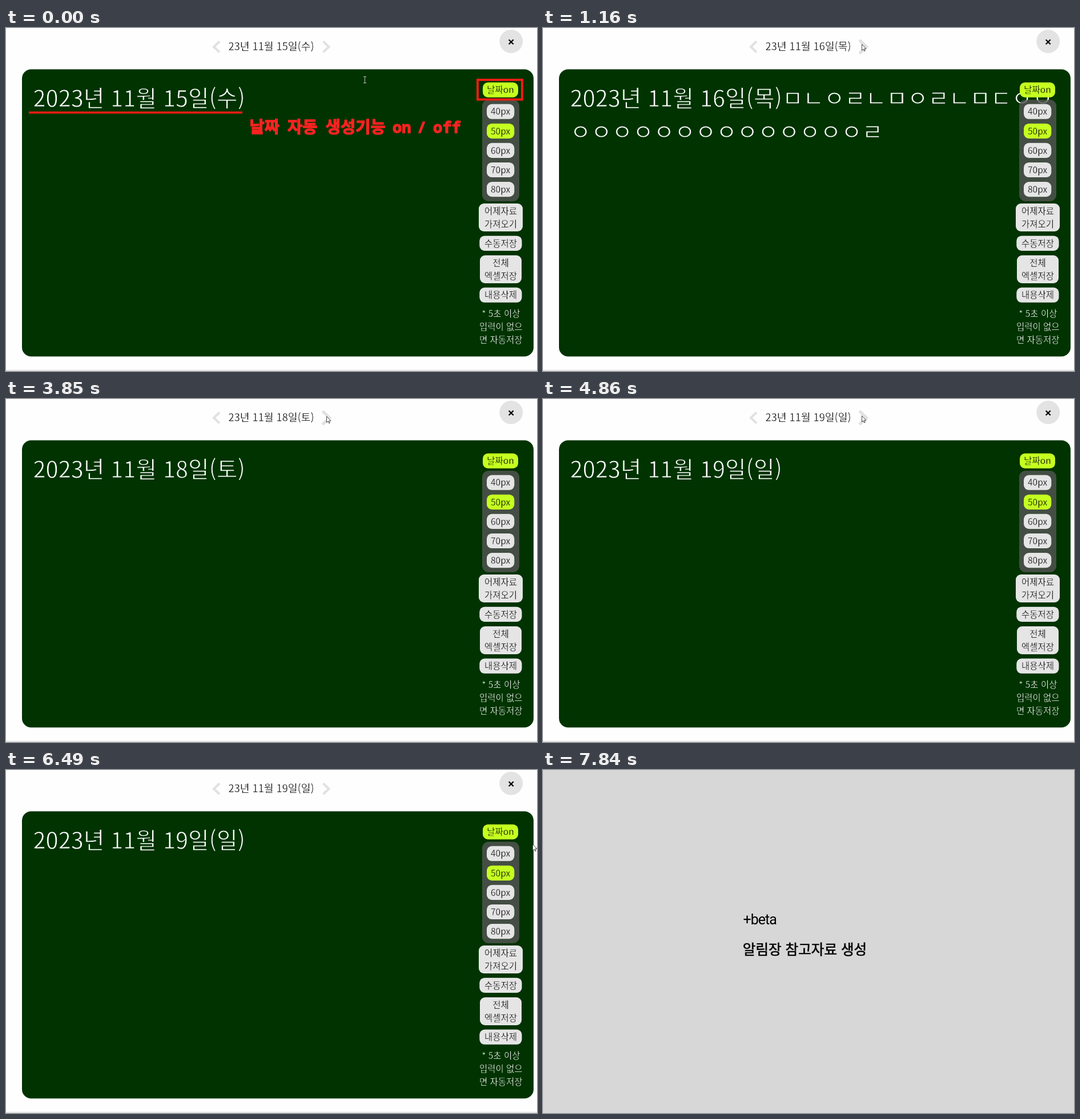
An HTML page for the animation above (8 s loop, 930 by 602 pixels).

```html
<!DOCTYPE html>
<html lang="ko">
<head>
<meta charset="utf-8">
<title>알림장</title>
<style>
  html, body { margin: 0; width: 100%; height: 100%; overflow: hidden; background: #fefefe; }
  svg { display: block; width: 100%; height: 100%; }
  text { font-family: "Noto Sans CJK KR", "Noto Sans CJK", sans-serif; font-weight: 350; }
  /* a stroke in the background colour thins the regular weight */
  .board { font-size: 39.7px; font-weight: 300; fill: #fff; stroke: #003300; stroke-width: .9; }
  .header { font-size: 18.2px; text-anchor: middle; stroke: #fefefe; stroke-width: .35; }
  .label { font-size: 15.5px; text-anchor: middle; stroke-width: .35; }
  .chevron { fill: none; stroke: #e1e1e1; stroke-width: 4; }
  .callout { font-size: 28.5px; font-weight: 900; word-spacing: 6.2px;
             fill: #ff2222; stroke: #ff2222; stroke-width: 1.3; stroke-linejoin: round; }
  .mono { font-family: "Noto Sans Mono", "DejaVu Sans Mono", monospace; font-size: 27px; }
  .title { font-size: 24.6px; font-weight: 400; stroke: #000; stroke-width: .6; }
  .beta { font-family: Roboto, sans-serif; font-size: 25px; font-weight: 400; letter-spacing: -1px; }
</style>
</head>
<body>
<svg viewBox="0 0 930 602" preserveAspectRatio="none">
  <g id="app">
    <rect width="930" height="602" fill="#fefefe"/>
    <rect y="600" width="930" height="1.5" fill="#dcdcdc"/>
    <path id="prev" class="chevron" d="M5 -9.5L-5 0L5 9.5"/>
    <path id="next" class="chevron" d="M-5 -9.5L5 0L-5 9.5"/>
    <text id="header" class="header" x="464.6" y="39.3"/>
    <circle cx="884.7" cy="23.5" r="20.5" fill="#e3e3e3"/>
    <path d="M880.7 20.5l8 8m0-8l-8 8" stroke="#000" stroke-width="2.3"/>
    <rect x="28" y="72.5" width="896" height="504" rx="16" fill="#003300"/>
    <text id="line1" class="board" x="47.6" y="138.4"/>
    <text id="line2" class="board" x="47.6" y="197"/>
    <rect x="834" y="126" width="65" height="178" rx="11" fill="#555" fill-opacity=".8"/>
    <g id="controls"></g>
    <g id="callout">
      <rect x="40" y="146.5" width="374" height="3.7" fill="#ee1c14"/>
      <rect x="826" y="91" width="78" height="34.5" fill="none" stroke="#ee1c14" stroke-width="4"/>
      <text class="callout" x="426.5" y="183.5">날짜 자동 생성기능<tspan class="mono" x="677">on</tspan><tspan class="mono" x="720">/</tspan><tspan class="mono" x="748">off</tspan></text>
    </g>
    <g id="cursor">
      <path id="beam" d="M-2.5 -5.5H2.5M0 -5.5V5.5M-2.5 5.5H2.5" stroke="#b4c4b4" fill="none"/>
      <path id="arrow" d="M.5 .5V11.3L3 9L4.8 12.7L6.3 12L4.6 8.4H8Z" fill="#fff" stroke="#333" stroke-width=".9"/>
      <path id="hand" d="M2.8 9V1.7Q3.8 -.2 5 1.7V5.5L9.3 6.8Q10.6 7.4 10.4 9L9.2 13V15.8H4V13.6L.8 9.6Q.4 7.6 2.8 9Z" fill="#fff" stroke="#111" stroke-width=".9"/>
    </g>
  </g>
  <g id="card">
    <rect width="930" height="602" fill="#d7d7d7"/>
    <text class="beta" x="350.5" y="271">+beta</text>
    <text class="title" x="349.8" y="323.8">알림장 참고자료 생성</text>
  </g>
</svg>
<script>
const LOOP = 8000, CARD_AT = 7840;
const GREY = '#e5e5e5', LIME = '#c5ff20', BOARD = '#003300';
const $ = id => document.getElementById(id);
const show = (id, on) => $(id).style.display = on ? '' : 'none';

function add(tag, attrs, text = '') {
  const el = document.createElementNS('http://www.w3.org/2000/svg', tag);
  for (const key in attrs) el.setAttribute(key, attrs[key]);
  el.textContent = text;
  $('controls').append(el);
}

function label(text, x, y, fill, background) {
  add('text', { class: 'label', x, y: y + 5.7, fill, stroke: background }, text);
}

function button(x, y, width, height, fill, ...lines) {
  add('rect', { x, y, width, height, rx: 9, fill });
  lines.forEach((line, i) => label(line, x + width / 2,
    y + height / 2 + (i - (lines.length - 1) / 2) * 22.7, '#000', fill));
}

button(835, 95.5, 62, 26.2, LIME, '날짜on');
for (let i = 0; i < 5; i++)
  button(842, 133.6 + i * 34.1, 48.3, 26.2, i === 1 ? LIME : GREY, `${40 + i * 10}px`);
button(828, 308, 77, 49, GREY, '어제자료', '가져오기');
button(829.3, 364.7, 74.2, 26.2, GREY, '수동저장');
button(830, 399, 73, 49, GREY, '전체', '엑셀저장');
button(829.3, 455.6, 74.2, 26.2, GREY, '내용삭제');
['* 5초 이상', '입력이 없으', '면 자동저장'].forEach((line, i) =>
  label(line, 866.8, 501.3 + i * 23, '#fff', BOARD));

// start time, pointer shape, pointer x, pointer y, day, hovered chevron
const steps = [
  [0, 'beam', 628.5, 91, 15],
  [500, 'arrow', 554, 24, 15, 'next'],
  [830, 'arrow', 558, 28, 15, 'next'],
  [1160, 'arrow', 558, 28, 16, 'next'],
  [1510, 'arrow', 566, 29, 16, 'next'],
  [1830, 'arrow', 561, 30, 16, 'next'],
  [2160, 'arrow', 561, 30, 17, 'next'],
  [3850, 'arrow', 561, 30, 18, 'next'],
  [4860, 'arrow', 558, 29, 19, 'next'],
  [5510, 'hand', 872, 114.5, 19],
  [5840, 'hand', 862, 95.5, 19],
  [6160, 'hand', 840, 109.5, 19],
  [6490, 'arrow', 922, 130, 19],
  [6850, 'arrow', 425, 52, 19],
  [7160, 'arrow', 369, 31, 19, 'prev'],
];

const notes = { 16: ['ㅁㄴㅇㄹㄴㅁㅇㄹㄴㅁㄷㅇㅇ', 'ㅇ'.repeat(14) + 'ㄹ'] };

function placeChevron(id, x, hovered) {
  $(id).setAttribute('transform', `translate(${x} 33) scale(${hovered === id ? 1.25 : 1})`);
}

function render(time) {
  const [, shape, x, y, day, hovered] = steps.findLast(step => step[0] <= time);
  const date = `23년 11월 ${day}일(${'수목금토일'[day - 15]})`;
  const [first, second] = notes[day] || ['', ''];
  $('header').textContent = date;
  $('line1').textContent = '20' + date + first;
  $('line2').textContent = second;
  placeChevron('prev', 369, hovered);
  placeChevron('next', 560.5, hovered);
  $('cursor').setAttribute('transform', `translate(${x} ${y})`);
  for (const id of ['beam', 'arrow', 'hand']) show(id, id === shape);
  show('callout', time < 500);
  show('app', time < CARD_AT);
  show('card', time >= CARD_AT);
}

const start = performance.now();
function tick() {
  render((performance.now() - start) % LOOP);
  requestAnimationFrame(tick);
}
tick();
</script>
</body>
</html>
```
